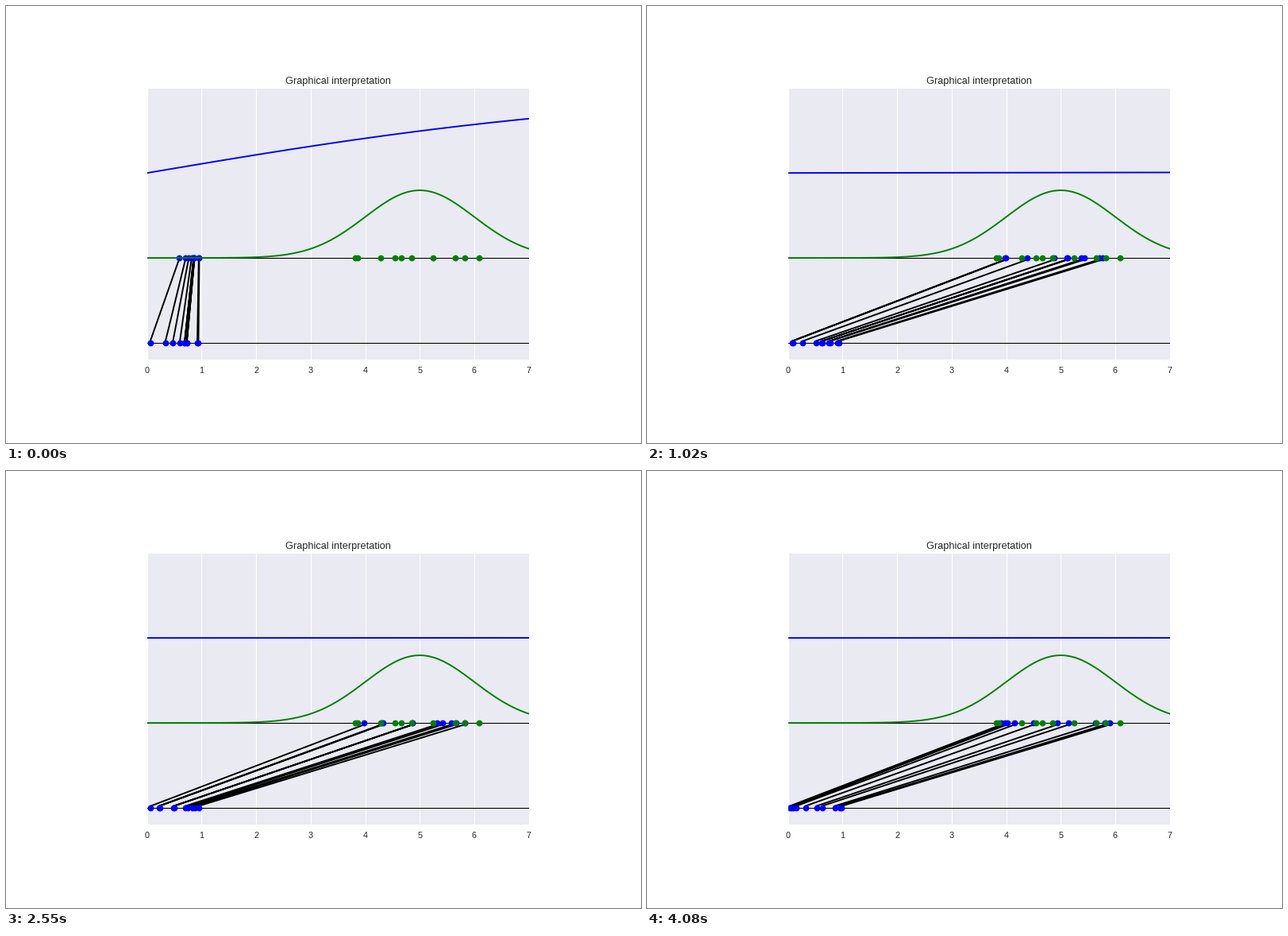
Write a matplotlib script that moves like this. It is 800x550 px and loops after 4.25 s.

```python
import numpy as np
import matplotlib.pyplot as plt
from matplotlib.animation import FuncAnimation

W, H, DPI = 800, 550, 80
FRAMES, STEP = 25, 170
LEFT, RIGHT, TOP, BOTTOM = 177.7, 658.7, 103.7, 445.1
REAL = [3.81, 3.855, 4.28, 4.54, 4.655, 4.845, 5.25, 5.645, 5.83, 6.09]

plt.rcParams.update({
    "font.family": "Liberation Sans",
    "text.color": "0.15",
    "xtick.labelcolor": "0.15",
})


def settle(i):
    """Damped swing from 1 to 0 as the training converges."""
    return np.exp(-i / 1.2) * np.cos(1.1 * i)


def generate(z, i):
    s = settle(i)
    return (2.09 - 1.67 * s) * z + 3.84 - 3.28 * s


def discriminate(x, i):
    sway = 0.04 * (1 + np.cos(2 * np.pi * (i - 1) / 9))
    slope = (sway + 1.45 * settle(i)) / 7
    return 1 / (1 + np.exp(-slope * x - 0.005))


def noise(i):
    return np.random.default_rng(40 + i).random(10)


fig = plt.figure(figsize=(W / DPI, H / DPI), dpi=DPI, facecolor="white")
ax = fig.add_axes([LEFT / W, 1 - BOTTOM / H,
                   (RIGHT - LEFT) / W, (BOTTOM - TOP) / H],
                  facecolor="#EAEAF2")
ax.set(xlim=(0, 7), ylim=(-0.6, 1), yticks=[])
ax.set_axisbelow(True)
ax.grid(axis="x", color="white", lw=1)
ax.tick_params(length=0, pad=7.8, labelsize=9.8)
ax.set_title("Graphical interpretation", fontsize=11.5, pad=5.2)
for spine in ax.spines.values():
    spine.set_visible(False)

for level in (0, -0.5):
    ax.axhline(level, color="black", lw=1, zorder=2)

xs = np.linspace(0, 7, 200)
dots = dict(ls="", marker="o", ms=7, mew=0)
links, = ax.plot([], [], color="black", lw=1.75, zorder=2,
                 solid_capstyle="projecting")
latent, = ax.plot([], [], color="blue", zorder=3, **dots)
fake, = ax.plot([], [], color="blue", zorder=3, **dots)
ax.plot(REAL, np.zeros(len(REAL)), color="green", zorder=4, **dots)
ax.plot(xs, np.exp(-(xs - 5) ** 2 / 2) / np.sqrt(2 * np.pi),
        color="green", lw=1.75, zorder=4)
decision, = ax.plot([], [], color="blue", lw=1.75, zorder=4)


def update(i):
    z = noise(i)
    g = generate(z, i)
    # NaN gaps split one line into separate links.
    gap = np.full(len(z), np.nan)
    links.set_data(np.column_stack([z, g, gap]).ravel(),
                   np.tile([-0.49, -0.01, np.nan], len(z)))
    latent.set_data(z, np.full(len(z), -0.5))
    fake.set_data(g, np.zeros(len(z)))
    decision.set_data(xs, discriminate(xs, i))
    return links, latent, fake, decision


anim = FuncAnimation(fig, update, frames=FRAMES, interval=STEP,
                     repeat=True, repeat_delay=0)
plt.show()
```
